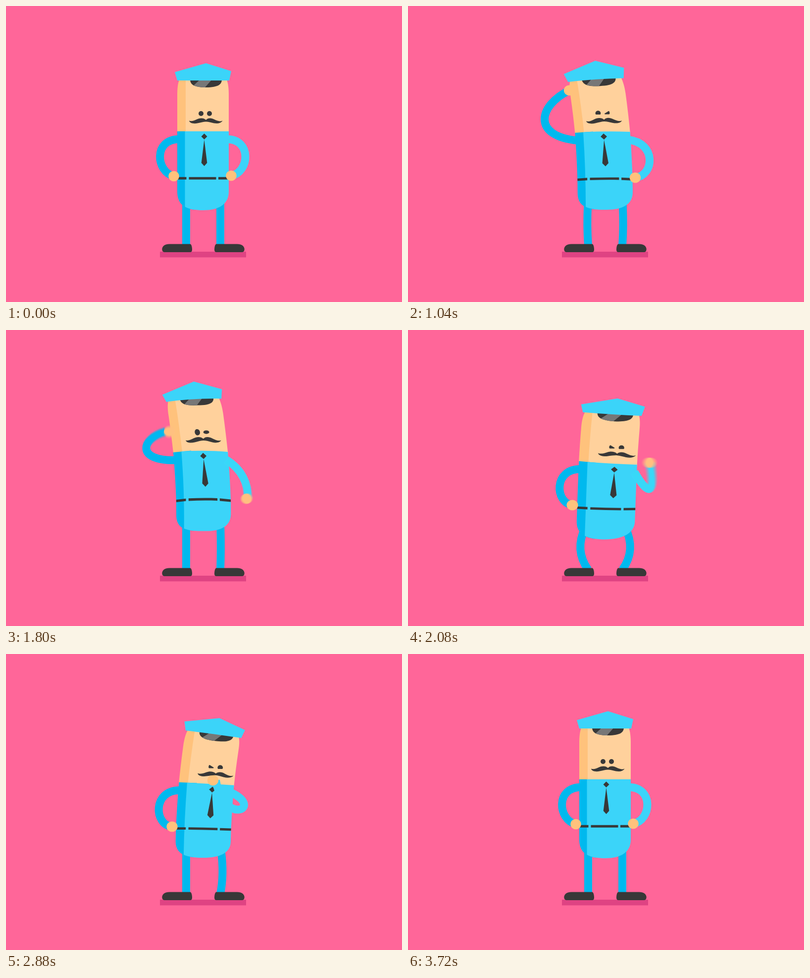
Recreate the animation shown at these times as an HTML page with a canvas. Size 800 px wide and 600 px high, loop 3960 ms.

```html
<!DOCTYPE html>
<html lang="en">
<head>
<meta charset="utf-8">
<title>Officer</title>
<style>
html, body { margin: 0; width: 100%; height: 100%; overflow: hidden; background: #ff6699; }
canvas { display: block; width: 800px; height: 600px; }
</style>
</head>
<body>
<canvas id="stage" width="800" height="600"></canvas>
<script>
const LOOP = 3960, STEP = 40, SHUTTER = 16, SAMPLES = 8;
const PINK = '#ff6699', SHADOW = '#df4383', INK = '#383838', GLARE = '#777777';
const BLUE = '#3bd4f9', DEEP = '#00b9ee', SKIN = '#ffd19c', TAN = '#ffc27c';

const ctx = document.getElementById('stage').getContext('2d');
const layer = document.createElement('canvas');
layer.width = 800;
layer.height = 600;
const lctx = layer.getContext('2d');

// Spine pose: width, head x y tilt, collar x y tilt, belt x y, bottom y, arc
const REST = [1, 398, 151, 0, 398, 254, 0, 398, 349, 414, 0];
const SWING = [1.115, 387, 157, -.018, 394, 261.5, .009, 397, 356.5, 422, 0];
const SALUTE = [1.07, 379, 150, -.07, 393, 256, -.018, 398, 351.5, 415, -2];
const REACH = [1.06, 379, 142.5, -.06, 393, 247.5, -.01, 399, 346, 411, -3.5];
const CROUCH = [1.13, 412, 170.5, .06, 404, 269.5, .06, 400.5, 361.5, 423.5, 1];
const THINK = [1.07, 418.5, 162.5, .135, 405, 263, .053, 399, 354.5, 413.5, -.5];

// Stretch (dy < 0) or squash (dy > 0) a spine pose
function lift(pose, dy, dw) {
  const p = pose.slice();
  p[0] += dw;
  p[2] += dy;
  p[5] += dy;
  p[8] += dy * .6;
  p[9] += dy * .45;
  return p;
}

const spineKeys = [
  [520, REST], [610, lift(REST, -9, -.02)], [720, SWING], [860, lift(SALUTE, -8, -.04)],
  [1040, SALUTE], [1180, lift(SALUTE, -3, -.01)], [1360, SALUTE], [1640, SALUTE],
  [1800, REACH], [2080, CROUCH], [2230, lift(THINK, -5, -.03)], [2380, lift(THINK, 2, .01)],
  [2520, THINK], [2880, THINK], [3000, lift(REST, -9, -.01)], [3120, lift(REST, 9, .11)],
  [3280, lift(REST, -3, -.02)], [3430, lift(REST, 2, .02)], [3600, REST]
];

// Arm pose: two control points, wrist, hand shift
const HIP_L = [297, 270, 303, 336, 339, 345, 0];
const BROW = [250, 264, 263, 202, 326, 171, 0];
const WAIST_L = [295, 275, 299, 347, 335.5, 350, 0];
const leftKeys = [
  [520, HIP_L],
  [640, [290, 290, 232, 300, 198, 238, -3]],
  [720, [280, 294, 232, 262, 236, 180, -6]],
  [800, [255, 285, 225, 215, 283, 160, 0]],
  [900, [247, 264, 260, 200, 326, 168, 0]],
  [1040, BROW], [1640, BROW],
  [1800, [262, 266, 272, 220, 322, 206, 8]],
  [1900, [272, 275, 280, 290, 305, 290, 4]],
  [2000, [288, 278, 292, 342, 328, 350, 0]],
  [2080, [293, 281, 297, 350, 332, 355, 0]],
  [2250, WAIST_L], [2880, WAIST_L],
  [3000, [297, 262, 301, 330, 337, 338, 0]],
  [3120, [286, 280, 294, 350, 336, 355, 0]],
  [3290, [298, 268, 304, 334, 340, 343, 0]],
  [3440, HIP_L]
];

const HIP_R = [497, 270, 492, 337, 455, 344, 0];
const WAIST_R = [502, 278, 498, 343, 459, 348, 0];
const CHIN = [522, 312, 440, 350, 424, 256, -6];
const rightKeys = [
  [520, HIP_R],
  [610, [497, 263, 492, 330, 454, 337, 0]],
  [720, [501, 282, 497, 342, 461, 353, 0]],
  [860, [502, 274, 498, 340, 458, 345, 0]],
  [1040, WAIST_R], [1640, WAIST_R],
  [1800, [476, 282, 490, 312, 488, 342, -2]],
  [1920, [480, 300, 520, 330, 542, 296, 0]],
  [2000, [484, 322, 530, 335, 528, 268, 0]],
  [2080, [486, 338, 500, 335, 489, 269, -1]],
  [2160, [510, 325, 462, 350, 440, 258, -4]],
  [2240, CHIN], [2880, CHIN],
  [3000, [500, 290, 485, 325, 460, 318, 0]],
  [3120, [507, 284, 499, 348, 461, 354, 0]],
  [3290, [495, 268, 491, 335, 454, 342, 0]],
  [3440, HIP_R]
];

// Face pose: sideways shift, squint side, stare
const faceKeys = [
  [520, [0, 0, 0]], [660, [0, -1, 0]], [1040, [-1, -1, 0]], [1640, [-1, -1, 0]],
  [1800, [2, 0, 1]], [1960, [8, 1, 0]], [2080, [10.5, 1, 0]], [2240, [10, 1, 0]],
  [2880, [10, 1, 0]], [3080, [0, 0, 0]]
];

// Cubic interpolation that flattens at extremes, so holds stay still
function sample(keys, t) {
  const last = keys.length - 1;
  if (t <= keys[0][0]) return keys[0][1];
  if (t >= keys[last][0]) return keys[last][1];
  let i = 0;
  while (keys[i + 1][0] <= t) i++;
  const span = keys[i + 1][0] - keys[i][0];
  const s = (t - keys[i][0]) / span;
  return keys[i][1].map((a, k) => {
    const rate = j => j < 0 || j >= last ? 0
      : (keys[j + 1][1][k] - keys[j][1][k]) / (keys[j + 1][0] - keys[j][0]);
    const slope = j => {
      const p = rate(j - 1), q = rate(j);
      return p * q <= 0 ? 0 : 2 * p * q / (p + q);
    };
    const b = keys[i + 1][1][k];
    const e = s * s * (3 - 2 * s);
    return a + (b - a) * e
      + span * (slope(i) * s * (1 - s) ** 2 - slope(i + 1) * s * s * (1 - s));
  });
}

// Bends upright coordinates along the spine
const ROWS = [151, 254, 349, 414];
function makeWarp([w, hx, hy, ht, cx, cy, ct, bx, by, bottom, arc]) {
  const xs = [hx, cx, bx, 398], ys = [hy, cy, by, bottom], tilts = [ht, ct, ct * .4, 0];
  return (x, y) => {
    const weights = ROWS.map((r, i) =>
      ROWS.reduce((m, q, j) => i === j ? m : m * (y - q) / (r - q), 1));
    const mix = v => weights.reduce((sum, k, i) => sum + k * v[i], 0);
    const u = (x - 398) * w;
    return [mix(xs) + u, mix(ys) + u * mix(tilts) + arc * (1 - (u / 55) ** 2)];
  };
}

function fill(color, d) {
  ctx.fillStyle = color;
  ctx.fill(new Path2D(d));
}

function blur(n, draw) {
  if (n === 1) return draw(ctx, 0);
  lctx.clearRect(0, 0, 800, 600);
  lctx.globalCompositeOperation = 'lighter';
  lctx.globalAlpha = 1 / n;
  for (let i = 0; i < n; i++) draw(lctx, (i / (n - 1) - .5) * SHUTTER);
  ctx.drawImage(layer, 0, 0);
}

function arm(keys, t, color, [sx, sy], w) {
  const a = sample(keys, t - SHUTTER / 2), b = sample(keys, t + SHUTTER / 2);
  const n = Math.hypot(b[4] - a[4], b[5] - a[5]) > 2.5 ? SAMPLES : 1;
  blur(n, (c, dt) => {
    const p = sample(keys, t + dt);
    c.strokeStyle = color;
    c.lineWidth = 16;
    c.beginPath();
    c.moveTo(sx, sy);
    c.bezierCurveTo(p[0], p[1], p[2], p[3], p[4], p[5]);
    c.stroke();
  });
  blur(n, (c, dt) => {
    const p = sample(keys, t + dt);
    c.fillStyle = TAN;
    c.beginPath();
    c.ellipse(p[4] + p[6], p[5], 10.7 * (.4 + .6 * w), 10.5, 0, 0, 7);
    c.fill();
  });
}

function leg(foot, side, bend) {
  ctx.strokeStyle = DEEP;
  ctx.lineWidth = 16;
  ctx.beginPath();
  ctx.moveTo(foot + side * bend * .4, 400);
  ctx.quadraticCurveTo(foot + side * bend * 2, 446, foot, 486);
  ctx.stroke();
}

function eye([x, y], side, squint, stare, w) {
  const k = Math.abs(squint), wedge = side * squint < 0 ? k : 0;
  const inner = -9 + 12.6 * wedge, outer = -9 + 1.4 * wedge;
  const low = 9 - 6.3 * k;
  ctx.save();
  ctx.translate(x, y);
  ctx.beginPath();
  ctx.moveTo(-9, side < 0 ? outer : inner);
  ctx.lineTo(9, side < 0 ? inner : outer);
  ctx.lineTo(9, low);
  ctx.lineTo(-9, low);
  ctx.clip();
  ctx.fillStyle = INK;
  ctx.beginPath();
  const rx = 5 * w + (side > 0 ? stare * .7 : 0);
  ctx.ellipse(0, 0, rx, 5 - side * 1.4 * stare, side < 0 ? -.3 * stare : 0, 0, 7);
  ctx.fill();
  ctx.restore();
}

const SHOE = 'M320,499C313,499 312,482.5 330,482.5L372,482.5C375,482.5 376,490 376,494Q376,499 372,499Z';
const flip = d => d.replace(/([\d.]+),/g, (_, x) => 797 - x + ',');

function draw(t) {
  const spine = sample(spineKeys, t), w = spine[0];
  const warp = makeWarp(spine);
  const [shift, squint, stare] = sample(faceKeys, t);
  const front = (x, y) => {
    const [px, py] = warp(x, y);
    return [px + shift, py + Math.max(0, shift) * .2];
  };
  const shape = (color, d, map = warp) =>
    fill(color, d.replace(/([\d.]+),([\d.]+)/g, (_, x, y) => map(+x, +y).join()));

  ctx.fillStyle = PINK;
  ctx.fillRect(0, 0, 800, 600);
  ctx.fillStyle = SHADOW;
  ctx.fillRect(311, 498, 174, 11.5);

  const bend = Math.max(0, (spine[9] - 414) * 1.5);
  leg(364, -1, bend);
  leg(433, 1, Math.max(bend, shift * .4));
  fill(INK, SHOE);
  fill(INK, flip(SHOE));

  // Head
  shape(TAN, 'M346,257C346,232 346,207 346,180C346,168 347,158 350,149L380,149L380,257Z');
  shape(SKIN, 'M363,257C363,222 363,186 363,149L446,149C449,158 450,168 450,180C450,207 450,232 450,257Z');
  shape(INK, 'M372,149L436,149C436,158 430,165 404,165C378,165 372,158 372,149Z');
  shape(GLARE, 'M392,149L416,149L402,165C392,165 384,163 379,161Z');
  shape(BLUE, 'M341,134L404,116L455,132L451,151C416,151 381,151 346,151Z');

  // Uniform
  shape(DEEP, 'M346,254L380,254L380,413C358,410 346,399 346,376L346,349C346,318 346,286 346,254Z');
  shape(BLUE, 'M361.5,254C391,254 420,254 450,254C450,286 450,318 450,349L450,376'
    + 'C450,402 430,414 398,414C383,414 371,412 361.5,407C361.5,356 361.5,305 361.5,254Z');
  shape(INK, 'M346,346.7L364.5,346.7L364.5,351.7L346,351.7Z');
  shape(INK, 'M369.5,346.7C388,346.7 406,346.7 424.5,346.7L424.5,351.7C406,351.7 388,351.7 369.5,351.7Z');
  shape(INK, 'M429,346.7L450,346.7L450,351.7L429,351.7Z');
  shape(INK, 'M400.5,258.5L406.5,264.5L400.5,270.5L394.5,264.5Z', front);
  shape(INK, 'M400.5,271L406.3,318L400.5,324.5L394.7,318Z', front);

  arm(leftKeys, t, DEEP, warp(350, 270), w);
  arm(rightKeys, t, BLUE, warp(446, 270), w);

  // Face
  eye(front(394, 218), -1, squint, stare, w);
  eye(front(411, 218), 1, squint, stare, w);
  shape(INK, 'M404,231C399,226 391,227 386,229.5C380,232.5 374,234.5 370,232.5'
    + 'C371,238 380,239 387,237.5C394,236 399,234.5 404,234.5C409,234.5 414,236 420,237.5'
    + 'C428,239 435,237 437.5,232.5C433,235 427,233 421,230C415,226.5 408,226.5 404,231Z', front);
}

function tick() {
  const t = performance.now() - start;
  draw(Math.floor(t % LOOP / STEP) * STEP);
  requestAnimationFrame(tick);
}
const start = performance.now();
tick();
</script>
</body>
</html>
```
